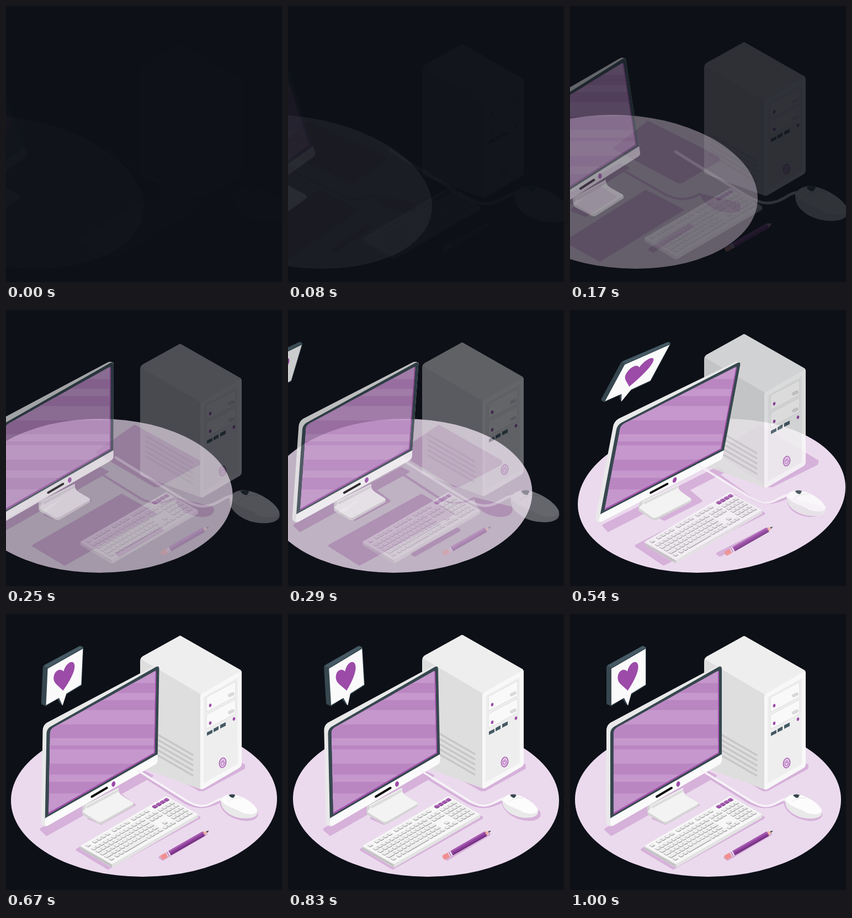
Write an HTML page that moves like this. It is 500 px wide and 500 px high and loops after 1.04 s.

```html
<!DOCTYPE html>
<html lang="en">
<head>
<meta charset="utf-8">
<title>Desk setup</title>
<style>
  html, body { margin: 0; width: 100%; height: 100%; overflow: hidden; background: #0d1017; }
  svg { display: block; width: 100%; height: 100%; }
</style>
</head>
<body>
<svg viewBox="0 0 500 500">
  <defs>
    <clipPath id="screenClip"><path d="M79 363V217Q79 209 86 205L266 104Q270 102 270 106V252Z"/></clipPath>
  </defs>

  <g id="floor">
    <ellipse cx="250" cy="336.5" rx="241" ry="139.5" fill="#ebdaed"/>
    <g fill="#d6b1da" stroke="#d6b1da" stroke-linejoin="round" stroke-width="4">
      <path d="M64 390L75 400L264 293L250 286Z"/>
      <path d="M150 370L173 380L233 346L205 326Z"/>
      <path d="M130 427L187 461L351 369L290 335Z"/>
      <path d="M313 210L430 274V279L357 319L350 319L245 258Z"/>
      <path d="M280 441L286 445L364 399L360 396Z"/>
      <path d="M389 342C392 358 410 371 436 373C452 372 458 366 454 358Z"/>
      <path d="M245 292L325 342C345 352 362 353 388 340" fill="none"/>
    </g>
  </g>

  <g id="tower">
    <path d="M243 86Q243 80 248 77L313 41Q315 39 318 41L425 102Q427 104 427 107V272Q427 276 423 279L358 317Q354 319 350 317L246 279Q243 277 243 274Z" fill="#dedede"/>
    <path d="M244 82Q245 79 248 77L313 41Q315 39 318 41L425 102L427 105L353 146Z" fill="#eeeeee"/>
    <path d="M352 150Q352 146 356 144L423 105Q427 103 427 107V272Q427 276 423 279L358 317Q352 320 352 314Z" fill="#f8f8f8"/>
    <path d="M358 151L420 116V272L358 307Z" fill="#eeeeee"/>
    <g id="vents" stroke="#c7c7c7" stroke-width="3.5" stroke-linecap="round"/>
    <g fill="#f9f9f9" stroke="#dddddd" stroke-linejoin="round">
      <path d="M363 151L416 123V150L363 178Z"/>
      <path d="M363 183L416 155V181L363 209Z"/>
    </g>
    <path d="M405 148L411 145M405 179L411 176" stroke="#d9d9d9" stroke-width="6" stroke-linecap="round"/>
    <g fill="#9c4ba8">
      <ellipse cx="370" cy="166" rx="2.2" ry="3.2" transform="rotate(15 370 166)"/>
      <ellipse cx="370" cy="198" rx="2.2" ry="3.2" transform="rotate(15 370 198)"/>
      <ellipse cx="413" cy="190.500" rx="2.2" ry="3.200" transform="rotate(15 413 190.500)"/>
    </g>
    <path d="M364 215L374 210V216L364 221ZM376 208.500L385 203.500V210L376 214.500ZM388 201.500L398 196.500V203L388 208Z" fill="#455a64"/>
    <g transform="rotate(12 392.500 270)" fill="none" stroke="#9c4ba8">
      <ellipse cx="392.500" cy="270" rx="6" ry="9" fill="#e3c8e6" stroke-width="1.300"/>
      <path d="M390.500 267C388.500 271 390 275 392.500 275S396.500 271 394.500 267M392.500 265V270" stroke-width=".9"/>
    </g>
  </g>

  <g id="monitor">
    <path d="M140 347L205 315Q204 325 213 330L231 341Q234 343 233 348L178 380Q174 382 170 380L143 365Q140 363 140 359Z" fill="#d4d4d4"/>
    <path d="M145 347L205 315Q204 325 213 330L231 341Q234 343 231 345L178 375Q173 378 169 376L143 360Q140 358 143 355Q147 353 145 347Z" fill="#f3f3f3"/>
    <path d="M145 349L205 317V322L150 352Z" fill="#dddddd"/>
    <path d="M66 211Q66 202 73 197L264 95Q270 92 275 96V266Q275 270 270 273L79 383Q74 386 70 383Q66 381 66 376Z" fill="#e9e9e9"/>
    <path d="M73 372V217Q73 208 80 204L267 97Q275 92 275 100V256Z" fill="#37474f"/>
    <path d="M73 370L275 254V265Q275 270 270 273L79 383Q73 386 73 380Z" fill="#fafafa"/>
    <g clip-path="url(#screenClip)">
      <path d="M79 100H270V363H79Z" fill="#c597cc"/>
      <g id="stripes" fill="#ba86c2"/>
      <path d="M270 102V252L79 362" fill="none" stroke="#a14fab" stroke-width="3.500"/>
    </g>
    <path d="M157 331L184 315" stroke="#090909" stroke-width="4" stroke-linecap="round"/>
    <ellipse cx="196" cy="308" rx="3.300" ry="5" fill="#9c4ba8" transform="rotate(15 196 308)"/>
  </g>

  <g id="bubble">
    <path d="M66 97Q66 94 69 92L131 58Q134 57 138 61V129L111 146L105 165L102 164L95 154L75 167L68 164Q66 163 66 160Z" fill="#37474f"/>
    <path d="M67 94L131 58L137 61L75 97Z" fill="#455a64"/>
    <path d="M75 99L137 63V128L111 144L105 166L98 152L75 165Z" fill="#fafafa"/>
    <path d="M104.500 139C97 130 86 126 86.500 115C87 103 97 97 104 104C106 93 115 84 121 88C129 96 117 121 104.500 139Z" fill="#9c4ba8"/>
  </g>

  <g id="keyboard">
    <path d="M135 420L290 330L348 363V369L195 458Q192 460 189 458L135 426Z" fill="#e3e3e3"/>
    <path d="M135 422L192 454V459L135 426Z" fill="#c3c3c3"/>
    <path d="M135 420L290 330L348 363L192 453Z" fill="#f7f7f7"/>
    <g id="keys" transform="matrix(7.75 -4.5 8.143 4.714 135 420)"/>
  </g>

  <g id="pencil">
    <g transform="translate(281 442) rotate(-29.7)">
      <rect y="-4.500" width="14" height="9" rx="3" fill="#ef9090"/>
      <path d="M12 -4.500H18V4.500H12Z" fill="#eadcec"/>
      <path d="M14.500 -4.500V4.500" stroke="#9c4ba8"/>
      <path d="M18 -4.500H89L91 0L89 4.500H18Z" fill="#8d3f9a"/>
      <path d="M18 -4.500H89L90 -1.500H18Z" fill="#a75bb1"/>
      <path d="M18 2H90L89 4.500H18Z" fill="#733180"/>
      <path d="M88 -4.500L99 0L88 4.500L90 1.500L88 0L90 -1.500Z" fill="#eeb3a5"/>
      <path d="M95 -1.700L100 0L95 1.700Z" fill="#37474f"/>
    </g>
  </g>

  <g id="mouse">
    <path d="M238 283L325 337C340 346 352 351 366 346S382 335 396 334" fill="none" stroke="#f7f3f8" stroke-width="3.600" stroke-linecap="round"/>
    <path d="M390 341C388 331 402 325 413 327C430 330 451 343 456 356C460 370 440 373 421 369C405 365 390 354 390 341Z" fill="#e9e9e9"/>
    <path d="M390 338C391 330 403 325 413 327C430 330 451 343 456 355C456 365 440 364 428 360C421 353 402 352 390 338Z" fill="#fcfcfc"/>
    <path d="M402 341Q412 331 428 334" fill="none" stroke="#e3e3e3"/>
    <path d="M404 328Q410 325 416 328L413 333Q408 334 404 328Z" fill="#37474f"/>
  </g>
</svg>
<script>
const $ = id => document.getElementById(id);

for (let i = 0; i < 5; i++)
  $('vents').innerHTML += `<path d="M254 ${207 + i * 9.3}L338 ${255.5 + i * 9.3}"/>`;

for (const [y, h] of [[125, 18], [156, 18], [200, 25], [238, 7], [271, 20], [304, 21]])
  $('stripes').innerHTML += `<rect x="79" y="${y}" width="191" height="${h}"/>`;

// Keyboard plane: 20 units long, 7 units deep.
let keys = '';
function key(u, v, w = 0.8, top = '#ededed', side = '#a3a3a3') {
  keys += `<rect x="${u - 0.12}" y="${v + 0.08}" width="${w}" height=".72" rx=".15" fill="${side}"/>
    <rect x="${u}" y="${v}" width="${w - 0.08}" height=".62" rx=".15" fill="${top}"/>`;
}
for (let i = 0; i < 13; i++) key(0.7 + i + Math.ceil(i / 4) * 0.55, 0.35);
for (let i = 0; i < 4; i++) key(16.3 + i * 0.9, 0.35, 0.8, '#a65bb0', '#81398d');
for (let row = 0; row < 5; row++) {
  const v = 1.6 + row * 0.98, lead = 0.8 + (row % 4) * 0.25;
  key(0.7, v, lead);
  if (row < 4) {
    let u = 0.8 + lead;
    for (; u < 11.3; u += 0.95) key(u, v);
    key(u, v, 12.9 - u);
  } else {
    key(2, v); key(3, v); key(4, v, 5.2);
    for (let i = 0; i < 4; i++) key(9.4 + i * 0.92, v);
  }
  for (let i = 0; i < 3; i++)
    if (row < 2 || row === 4 || (row === 3 && i === 1)) key(13.3 + i * 0.9, v);
  for (let i = 0; i < 4; i++) key(16.3 + i * 0.9, v);
}
$('keys').innerHTML = keys;

// cubic-bezier(.36, -.01, .5, 1.38)
function ease(x) {
  if (x <= 0) return 0;
  if (x >= 1) return 1;
  const curve = (s, a, b) => 3 * s * (1 - s) ** 2 * a + 3 * s * s * (1 - s) * b + s ** 3;
  let lo = 0, hi = 1;
  for (let i = 0; i < 25; i++) {
    const mid = (lo + hi) / 2;
    if (curve(mid, 0.36, 0.5) < x) lo = mid; else hi = mid;
  }
  return curve(lo, -0.01, 1.38);
}

const tan = deg => Math.tan(deg * Math.PI / 180);
const mix = (a, b, p) => a + (b - a) * p;

function pose(id, opacity, transform) {
  $(id).setAttribute('opacity', Math.max(0, Math.min(1, opacity)));
  if (transform) $(id).setAttribute('transform', transform);
}

// Skewed entry from the left that swings back twice; cy is the pivot height.
function sweep(id, time, cy, from, angles) {
  const [a, b, c] = angles;
  const p = ease(time / 0.6);
  let shift = 0, skew;
  if (time < 0.6) {
    shift = from * (1 - p);
    skew = mix(tan(a), tan(b), p);
  } else if (time < 0.8) {
    skew = tan(mix(b, c, ease((time - 0.6) / 0.2)));
  } else {
    skew = tan(c) * (1 - ease((time - 0.8) / 0.2));
  }
  pose(id, p, `matrix(1 0 ${skew} 1 ${shift - skew * cy} 0)`);
}

function draw(ms) {
  const step = Math.floor((ms % 1040 + 2) / 41.6) % 25;
  const time = (step + 1) * (step < 10 ? 0.04 : 0.0412);
  const p = ease(time);
  sweep('floor', time, 336.5, -250, [20, -10, 2]);
  sweep('monitor', time, 240, -250, [20, -10, 2]);
  sweep('bubble', time, 112, -650, [30, -27, 5.5]);
  pose('tower', p, `translate(0 ${30 * (1 - p)})`);
  pose('keyboard', p);
  pose('pencil', p);
  pose('mouse', p, `translate(347 327) scale(${1.5 - 0.5 * p}) translate(-347 -327)`);
}

const start = performance.now();
function loop() {
  draw(performance.now() - start);
  requestAnimationFrame(loop);
}
loop();
</script>
</body>
</html>
```
